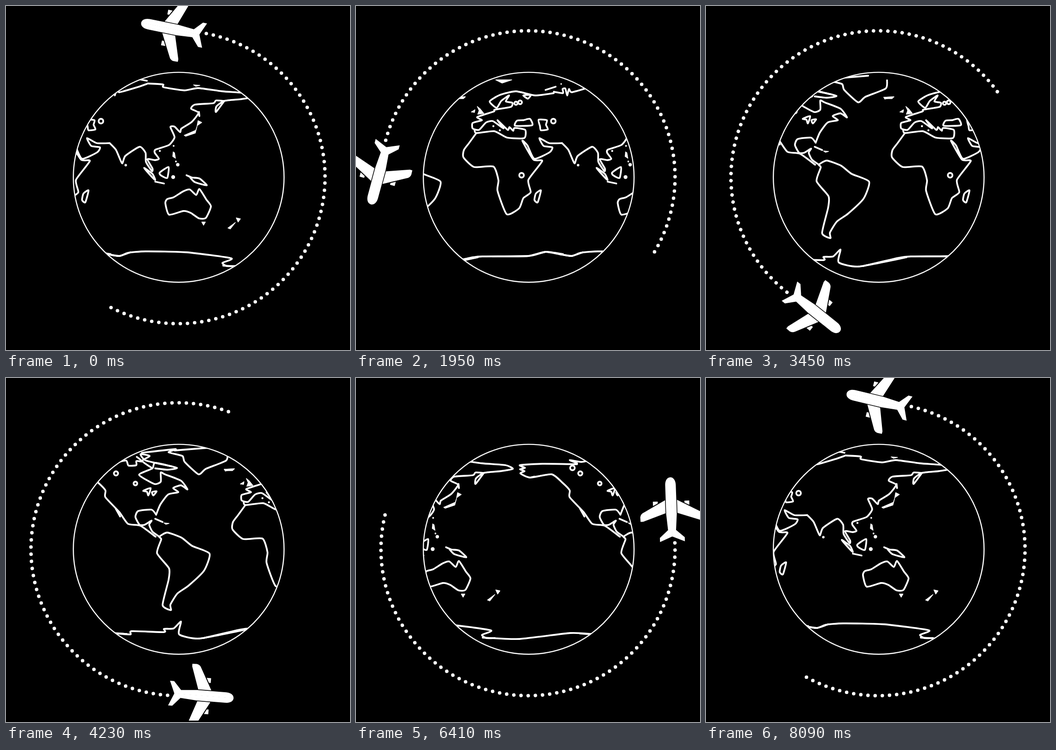
These frames come from a looping animation (747x750 px, 8130 ms). An HTML page:

```html
<!DOCTYPE html>
<html lang="en">
<head>
<meta charset="utf-8">
<title>Around the world</title>
<style>
  html, body { margin: 0; width: 100%; height: 100%; overflow: hidden; background: #000; }
  svg { display: block; overflow: hidden; }
  .coast { fill: none; stroke: #fff; stroke-width: 3.8; stroke-linejoin: round; stroke-linecap: round; }
  .isle { fill: #fff; stroke: #fff; stroke-width: 1.4; stroke-linejoin: round; }
</style>
</head>
<body>
<svg width="747" height="747" viewBox="0 0 747 747">
  <defs>
    <clipPath id="disc"><circle cx="375" cy="373.4" r="229"/></clipPath>
    <g id="world"></g>
  </defs>
  <g clip-path="url(#disc)"><g id="map"></g></g>
  <circle cx="375" cy="373.4" r="228.8" fill="none" stroke="#fff" stroke-width="2.4"/>
  <g id="orbit" fill="#fff">
    <g id="trail"></g>
    <g id="plane">
      <g id="side">
        <path d="M13 49.5L60 75Q67 78 68 85L67.7 95H62L13 78Z"/>
        <path d="M29 52H39.5V61.5L29 56Z"/>
        <path d="M-.3 0H0C7.5 0 11.5 8 11.5 17V80L8.7 115L27 131.5V140.5L0 129H-.3Z"/>
      </g>
      <use href="#side" transform="scale(-1 1)"/>
    </g>
  </g>
</svg>
<script>
const FPS = 22, STEPS = 179, LOOP = 8130;
const MAP_WIDTH = 925.5, TURN = 360 / STEPS;
const CX = 373.5, CY = 373.3, ORBIT = 319.3;
const $ = id => document.getElementById(id);

function add(parent, tag, attrs) {
  const el = document.createElementNS('http://www.w3.org/2000/svg', tag);
  for (const key in attrs) el.setAttribute(key, attrs[key]);
  parent.append(el);
  return el;
}

// Softly rounded line through a few points.
function curve(text, closed) {
  const v = text.split(' ').map(Number), n = v.length / 2;
  const at = i => {
    const j = closed ? (i + n) % n : Math.min(Math.max(i, 0), n - 1);
    return [v[2 * j], v[2 * j + 1]];
  };
  let d = 'M' + at(0);
  for (let i = 0; i < (closed ? n : n - 1); i++) {
    const [a, b, c, e] = [at(i - 1), at(i), at(i + 1), at(i + 2)];
    const p = b.map((s, k) => s + (c[k] - a[k]) / 10);
    const q = c.map((s, k) => s - (e[k] - b[k]) / 10);
    d += `C${p} ${q} ${c}`;
  }
  return d + (closed ? 'Z' : '');
}

// Each region has its own coordinates, shifted into the shared map.
function region(dx) {
  const g = add($('world'), 'g', { transform: `translate(${dx})` });
  return {
    coast: pts => add(g, 'path', { class: 'coast', d: curve(pts) }),
    ring: pts => add(g, 'path', { class: 'coast', d: curve(pts, true) }),
    isle: pts => add(g, 'path', { class: 'isle', d: `M${pts}Z` }),
    lake: (cx, cy, r) => add(g, 'circle', { class: 'coast', cx, cy, r }),
    dot: (cx, cy, r) => add(g, 'circle', { class: 'isle', cx, cy, r })
  };
}

const east = region(0);
east.coast('225 299 239 314 252 343 259 327 290 307 303 320 304 340 317 360 318 354 307 334 323 336 332 333 323 320 325 313 354 303 366 286 357 264 366 263 378 275 381 267 403 253 418 233 402 224 410 215 450 212 456 206 474 207');
east.coast('474 207 456 231 457 219 474 207 511 203 537 198 521 190 470 186 417 179 387 184 342 177 341 171 308 169');
east.coast('290 160 306 163');
east.coast('419 231 420 240');
east.ring('300 353 318 374 324 379 318 366');
east.coast('324 383 343 387');
east.ring('334 363 353 351 350 375 336 369');
east.coast('392 369 404 374 420 376 436 391 410 384 400 374');
east.ring('346 430 350 421 364 417 385 404 399 400 413 412 420 399 435 422 445 437 434 462 419 463 401 451 385 447 354 455');
east.coast('219 541 247 545 265 538 303 535 392 537 489 550 470 560 479 567 498 567');
east.isle('387 282L412 271 415 262 411 277 390 284');
east.isle('417 250L425 254 415 261');
east.isle('407 172L421 173 412 175');
east.isle('363 318L366 320 368 332 362 328');
east.isle('425 471H433L429 478');
east.isle('482 484L498 472 487 486');
east.isle('500 462L509 464 504 471');
east.dot(364, 305, 1.2);
east.dot(369, 339, 1.2);
east.dot(373, 346, 3);
east.dot(363, 373, 3.5);
east.dot(334, 316, 1.5);
east.dot(260, 347, 2);

const north = region(-144.8);
north.coast('352 187 372 190 371 181 377 180 381 195 385 181 391 188 430 177 453 169');
north.coast('334 183 356 176');
north.ring('319 248 337 249 335 259 339 269 324 271 322 262');
north.ring('268 261 272 250 286 249 300 246 305 260');
north.ring('324 402 317 428 310 423 313 409');
north.coast('219 546 296 545 335 536 388 545 415 537');
north.lake(351, 251, 5);
north.lake(282, 369, 5);
north.dot(368, 170, 1);

const west = region(-305);
west.coast('512 190 472 195 430 186 395 194 373 208 388 222 398 207 415 195 408 208 422 211 419 220 384 226 382 230 346 242 356 249 336 255 336 267 350 270 365 254 380 251 403 267 390 249 412 270 416 264 424 272 427 266 450 270 448 288 411 287 383 273 344 277 340 270');
west.coast('344 277 328 299 317 314 316 330 339 351 381 350 392 380 390 403 410 454 437 441 446 419 462 406 457 379 487 338 468 335 444 294 455 304 470 333 503 319 509 308 490 305 481 288 502 299 530 299');
west.coast('253 567 330 549 357 546 458 545 495 536 532 541');
west.ring('446 195 462 194 456 202');
west.isle('333 231L341 226 340 232');
west.isle('346 219L352 224 360 234 347 236 350 228');
west.isle('298 199L320 198 316 202 304 202');
west.isle('386 161L421 161 400 168');
west.lake(430, 212, 3.5);
west.lake(439, 210, 4);
west.dot(381, 262, 1.5);
west.dot(395, 271, 1.5);

const atlantic = region(-480.8);
atlantic.coast('326 298 316 287 287 290 281 303 290 320 301 320 316 311 311 320 318 335 333 346');
atlantic.coast('326 298 335 276 352 254 374 249 363 240 380 234 394 243 380 224 345 210 336 206 336 226 322 231 289 211 318 197 324 185 371 196 350 200 324 197');
atlantic.coast('361 193 304 180 292 166 312 170 296 181 318 197');
atlantic.coast('232 186 216 179 241 183 261 180 266 191 283 190 283 181 296 182 284 172');
atlantic.coast('295 163 368 155 353 162 383 170 388 183 418 210 434 198 478 180 481 162');
atlantic.coast('366 158 440 152');
atlantic.ring('333 346 350 337 381 348 404 366 442 383 430 420 396 453 372 470 357 494 358 506 340 495 353 440 354 415 328 382 337 352');
atlantic.coast('324 307 340 314');
atlantic.ring('298 246 314 240 309 256 306 248');
atlantic.ring('317 249 327 247 320 256');
atlantic.coast('238 557 270 559 273 552 343 554 343 547 364 546 380 531 376 559 420 568 523 548');
atlantic.isle('343 316L354 317 347 319');
atlantic.isle('474 199L496 198 476 203');
atlantic.lake(281, 230, 4);

const pacific = region(196.5);
pacific.coast('480 188 405 187 356 190 367 196 356 199 366 203 357 208 378 217 425 210 448 228 464 245 464 260 494 292 513 318 540 322 573 346');
pacific.coast('378 217 387 215');
pacific.coast('486 284 496 302');
pacific.coast('275 566 355 569 465 556 510 558');
pacific.lake(470, 196, 5);
pacific.lake(487, 208, 4.5);

for (const x of [-MAP_WIDTH, 0, MAP_WIDTH]) add($('map'), 'use', { href: '#world', x });

for (let i = 0; i <= 70; i++) {
  const a = (11.1 + 2.8 * i) * Math.PI / 180;
  add($('trail'), 'circle', { cx: CX + ORBIT * Math.sin(a), cy: CY - ORBIT * Math.cos(a), r: 3.8 });
}
$('plane').setAttribute('transform', `rotate(${141 * TURN} ${CX} ${CY}) translate(682.3 216.5) rotate(-2)`);

const start = performance.now();
function draw() {
  const t = (performance.now() - start) % LOOP;
  const step = Math.floor((Math.floor(t / 10) * 10 + 5) * FPS / 1000);
  $('map').setAttribute('transform', `translate(${step * MAP_WIDTH / STEPS})`);
  $('orbit').setAttribute('transform', `rotate(${-step * TURN} ${CX} ${CY})`);
  requestAnimationFrame(draw);
}
draw();
</script>
</body>
</html>
```
